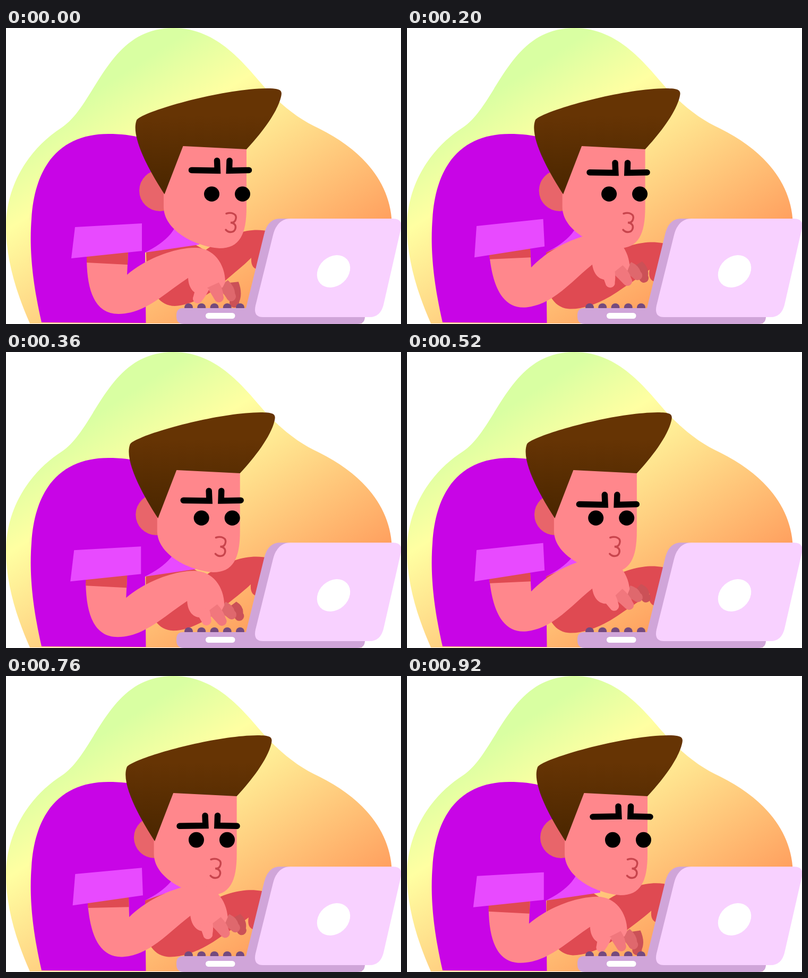
Recreate the animation shown at these times as an HTML page. Size 744 by 559 pixels, loop 960 ms.

```html
<!DOCTYPE html>
<html lang="en">
<head>
<meta charset="utf-8">
<title>Typing</title>
<style>
html, body { margin: 0; width: 100%; height: 100%; overflow: hidden; background: #fff; }
svg { display: block; width: 744px; height: 559px; }
.skin { fill: #ff878c; }
.shade { fill: #df4a52; }
.cloth { fill: #e84aff; }
.brow { fill: none; stroke: #000; stroke-width: 11.5; stroke-linecap: round; }
</style>
</head>
<body>
<svg viewBox="0 0 744 559">
  <defs>
    <linearGradient id="sky" gradientUnits="userSpaceOnUse" x1="103" y1="160" x2="376" y2="585">
      <stop offset="0" stop-color="#d9ffa2"/>
      <stop offset=".26" stop-color="#ffffa2"/>
      <stop offset="1" stop-color="#ffa05f"/>
    </linearGradient>
    <linearGradient id="brown" gradientUnits="userSpaceOnUse" x1="0" y1="165" x2="0" y2="300">
      <stop offset="0" stop-color="#663404"/>
      <stop offset="1" stop-color="#4c2700"/>
    </linearGradient>
  </defs>

  <path fill="url(#sky)" d="M45 558C15 490 0 430 0 375C0 300 40 230 105 188C170 145 190 0 315 0C400 0 450 70 490 115C525 152 555 174 590 190C680 235 727 300 727 375C727 440 700 500 670 558Z"/>

  <path id="farArm" class="shade" d="M264 408V424C264 480 280 525 318 525C347 524 382 505 412 478C430 462 446 450 462 434C461 448 466 455 476 456L495 384C470 378 430 380 375 420L348 404Z"/>
  <path id="farSleeve" class="cloth" d="M250 380L320 340L364 395V409L262 424Z"/>
  <path fill="#c805e6" d="M67 556C45 460 45 400 48 360C55 250 110 200 193 200C270 200 330 225 330 330C330 380 300 405 262 424L263.500 557Z"/>

  <circle id="ear" cx="290" cy="307" r="39" fill="#e8656a"/>
  <g id="head">
    <path class="skin" d="M320 210L453 215V338C453 390 440 416 402 416C352 412 297 380 297 338V300Z"/>
    <path fill="url(#brown)" d="M246 174C252 160 400 115 492 114C518 114 521 118 518 130C511 160 480 200 453 229L333.500 223L298.500 314C270 270 234 205 246 174Z"/>
  </g>
  <g id="eyes"><ellipse cx="387.500" rx="14.500"/><ellipse cx="445.500" rx="14.500"/></g>
  <path id="browL" class="brow"/>
  <path id="browR" class="brow"/>
  <path id="mouth" fill="none" stroke="#c8454d" stroke-width="3.500" stroke-linecap="round" d="M415 350.500C426 347 435 352 433 360C432 366 428 368 423 367.500C430 368 434 373 432 379C430 386 420 388 414 381"/>

  <g id="arm">
    <g id="behind"></g>
    <path class="skin" d="M152 438C153 505 172 540 212 540C262 540 300 500 343 472C344 492 354 502 366 503L378 495L408 490L413 480C413 445 390 414 355 415C310 416 258 440 228 466L230 423Z"/>
    <path class="shade" d="M152 430V443L229 447L230 422Z"/>
    <g id="front"></g>
  </g>
  <path id="sleeve" class="cloth" d="M130 376L256 369V421L123 435Z"/>

  <g id="keys" fill="#744a7e"></g>
  <path fill="#d0a5d9" d="M334 529H452L486 390Q493 360 516 360H560V529H676V545Q676 559 662 559H335Q321 559 321 545V542Q321 529 334 529Z"/>
  <path fill="#f8d1ff" d="M536 360H728Q748 360 744 378L711 523Q705 546 685 546H484Q465 546 470 524L503 391Q511 360 536 360Z"/>
  <ellipse cx="617" cy="459.500" rx="34" ry="27.500" fill="#fff" transform="rotate(-42 617 459.500)"/>
  <rect x="376" y="538" width="55.500" height="11" rx="5.500" fill="#fff"/>
</svg>

<script>
const LOOP = 960, STEP = 40, TAP = LOOP / 3;
const $ = id => document.getElementById(id);
const ease = p => (1 - Math.cos(Math.PI * Math.min(1, Math.max(0, p)))) / 2;

function place(id, x, y, turn = 0, px = 0, py = 0) {
  $(id).setAttribute('transform', `translate(${x} ${y}) rotate(${turn} ${px} ${py})`);
}

function add(parent, tag, attrs) {
  const el = document.createElementNS('http://www.w3.org/2000/svg', tag);
  for (const name in attrs) el.setAttribute(name, attrs[name]);
  return $(parent).appendChild(el);
}

for (let i = 0; i < 5; i++) add('keys', 'circle', { cx: 344 + 24.25 * i, cy: 528, r: 8 });

// Fingers from the nearest back: resting tip and how far it swings.
const fingers = [
  { fill: '#ff878c', tip: [361, 511], swing: [20, -2] },
  { fill: '#f1777d', tip: [401, 509], swing: [8, 1] },
  { fill: '#df686d', tip: [424, 507], swing: [3, -10] },
  { fill: '#cb5157', tip: [430, 519], swing: [12, -20] }
];
for (const f of [...fingers].reverse()) {
  f.el = add(fingers.indexOf(f) < 2 ? 'front' : 'behind', 'path', { fill: f.fill });
}

// Tapered finger with a round end, bulging to its outer side.
function finger(x, y, tx, ty, bend) {
  const wide = 12, r = 9;
  const len = Math.hypot(tx - x, ty - y);
  const ux = (tx - x) / len, uy = (ty - y) / len;
  const at = (along, side) => `${x + ux * len * along + uy * side} ${y + uy * len * along - ux * side}`;
  return `M${at(0, wide)}Q${at(.6, wide + bend)} ${at(1, r)}` +
    `A${r} ${r} 0 0 1 ${at(1, -r)}Q${at(.5, bend - wide)} ${at(0, -wide)}Z`;
}

function drawHead(t) {
  const lean = 24.5 * ease(t / 720) * (1 - ease((t - 720) / 120));
  const lift = ease((t - 720) / 120) * (1 - ease((t - 840) / 120));
  place('head', -lean, -8 * lift);
  place('ear', -.55 * lean, -8 * lift);
  place('eyes', -1.58 * lean, 313.5 - 16 * lift);
  for (const eye of $('eyes').children) eye.setAttribute('ry', 14.2 + 2.5 * lift);
  place('mouth', -1.6 * lean + 2 * lift, -16 * lift);

  const outer = 268.5 - 10.5 * lift, inner = 269.3 - 17 * lift;
  const brow = (x, dir) => `M${x} ${outer}L${x + 48.8 * dir} ${inner}l${-.8 * dir} -18.800`;
  $('browL').setAttribute('d', brow(349.5, 1));
  $('browR').setAttribute('d', brow(457.5, -.76));
  for (const id of ['browL', 'browR']) place(id, -1.25 * lean + 2 * lift, .95 * lean);
}

function drawArms(t) {
  const p = t % TAP;
  const raise = ease((p - 40) / 120) * ease((280 - p) / 80);
  const drop = ease(p / 130) * ease((TAP - p) / 90);
  const drift = -2.5 * Math.sin(2 * Math.PI * p / TAP) * (1 - raise);
  place('arm', drift, drift, -5.7 * raise, 92, 400);
  place('sleeve', drift, drift, -2.9 * raise, 92, 355);
  place('farArm', 0, 0, 6.5 * drop, 264, 400);
  place('farSleeve', 0, 0, -15 * raise, 262, 426);

  const sway = Math.sin(Math.PI * t / LOOP);
  fingers.forEach(({ el, tip, swing }, i) => {
    const [tx, ty] = tip.map((v, n) => v + swing[n] * sway);
    el.setAttribute('d', finger(372 + 18 * i, 488 - 2.5 * i, tx, ty, 2 * i));
  });
}

function draw(ms) {
  const t = Math.floor(ms / STEP) * STEP % LOOP;
  drawHead(t);
  drawArms(t);
}

const start = performance.now();
function tick() {
  draw(performance.now() - start);
  requestAnimationFrame(tick);
}
tick();
</script>
</body>
</html>
```
